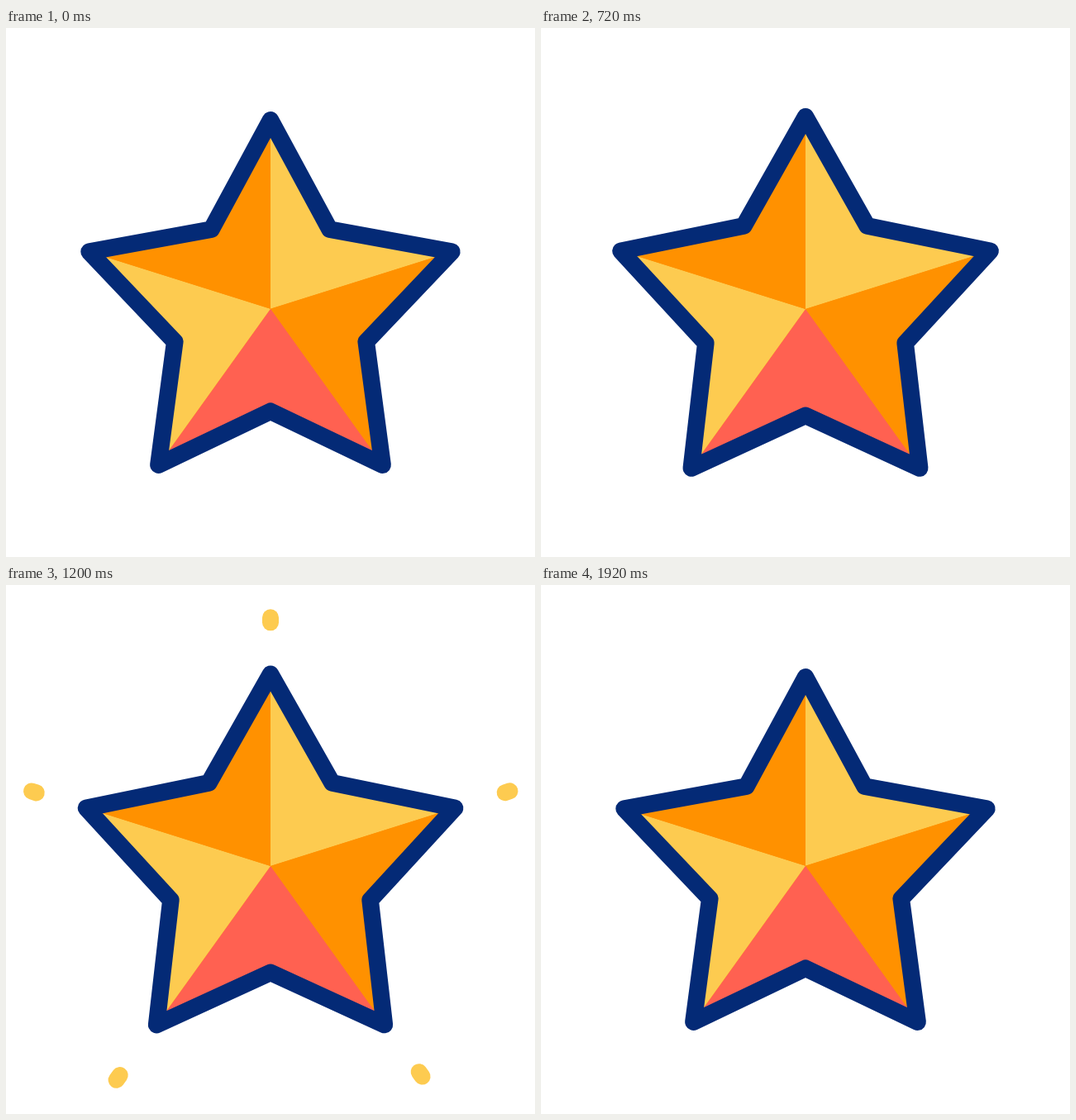
Animation, 640 px wide and 640 px high, one loop 2000 ms. Source, as an HTML page with a canvas:

```html
<!DOCTYPE html>
<html lang="en">
<head>
<meta charset="utf-8">
<title>Star</title>
<style>
  html, body { margin: 0; width: 100%; height: 100%; overflow: hidden; background: #fff; }
  canvas { display: block; width: 100vmin; height: 100vmin; }
</style>
</head>
<body>
<canvas id="stage" width="640" height="640"></canvas>
<script>
const ctx = document.getElementById('stage').getContext('2d');
const LOOP = 2000, CX = 320, CY = 342;
const NAVY = '#042a76', ORANGE = '#ff9100', YELLOW = '#fdcb50', RED = '#ff6151';
const FACETS = [YELLOW, ORANGE, RED, YELLOW, ORANGE]; // clockwise from the top tip

const REST  = { tip: 230.7, notch: 121.7 };
const SMALL = { tip: 202.2, notch: 121.7 };
const LARGE = { tip: 267.4, notch: 132 };

const RAY_START = 215;
const RAY_ENDS = [[320, 39.3], [609.5, 249.3], [503.6, 594.6], [133.6, 598.8], [31, 249.5]];

const mix = (a, b, k) => a + (b - a) * k;

// Symmetric ease, cubic-bezier(.5, 0, .5, 1), solved by bisection.
function ease(u) {
  if (u <= 0) return 0;
  if (u >= 1) return 1;
  let lo = 0, hi = 1;
  for (let i = 0; i < 24; i++) {
    const s = (lo + hi) / 2;
    if (1.5 * s * (1 - s) + s * s * s < u) lo = s; else hi = s;
  }
  return lo * lo * (3 - 2 * lo);
}

const progress = (t, from, to) => ease((t - from) / (to - from));

// Shrink, burst, shrink again, settle.
function radius(t, part) {
  let r = mix(REST[part], SMALL[part], progress(t, 200, 480));
  r = mix(r, LARGE[part], progress(t, 480, 960));
  r = mix(r, SMALL[part], progress(t, 960, 1440));
  return mix(r, REST[part], progress(t, 1440, 1800));
}

// Point at a number of fifths of a turn, clockwise from the top.
function polar(cy, r, fifths) {
  const a = fifths * Math.PI * 2 / 5;
  return [CX + r * Math.sin(a), cy - r * Math.cos(a)];
}

function trace(points) {
  ctx.beginPath();
  points.forEach(([x, y]) => ctx.lineTo(x, y));
  ctx.closePath();
}

function fill(points, color) {
  trace(points);
  ctx.fillStyle = color;
  ctx.fill();
}

function drawRays(t) {
  const head = progress(t, 620, 1100), tail = progress(t, 820, 1300);
  if (head - tail < 0.001) return;
  ctx.strokeStyle = YELLOW;
  ctx.lineWidth = 20;
  for (const [x, y] of RAY_ENDS) {
    const start = RAY_START / Math.hypot(x - CX, y - CY);
    const along = k => [mix(CX, x, mix(start, 1, k)), mix(CY, y, mix(start, 1, k))];
    ctx.beginPath();
    ctx.moveTo(...along(tail));
    ctx.lineTo(...along(head));
    ctx.stroke();
  }
}

function drawStar(t) {
  const tipR = radius(t, 'tip'), notchR = radius(t, 'notch');
  // The tips' centre sinks a little as the star grows.
  const tipCY = CY + (tipR - REST.tip) / 12;
  const hub = [CX, tipCY - 2.3];
  const tip = i => polar(tipCY, tipR, i);
  const notch = i => polar(CY, notchR, i + 0.5);
  const outline = FACETS.flatMap((_, i) => [tip(i), notch(i)]);

  fill(outline, ORANGE); // keeps the seams closed
  FACETS.forEach((color, i) => fill([hub, tip(i), notch(i), tip(i + 1)], color));

  trace(outline);
  ctx.strokeStyle = NAVY;
  ctx.lineWidth = 20.6;
  ctx.stroke();
}

function render() {
  const t = performance.now() % LOOP;
  ctx.fillStyle = '#fff';
  ctx.fillRect(0, 0, 640, 640);
  ctx.lineCap = ctx.lineJoin = 'round';
  drawRays(t);
  drawStar(t);
  requestAnimationFrame(render);
}

render();
</script>
</body>
</html>
```
